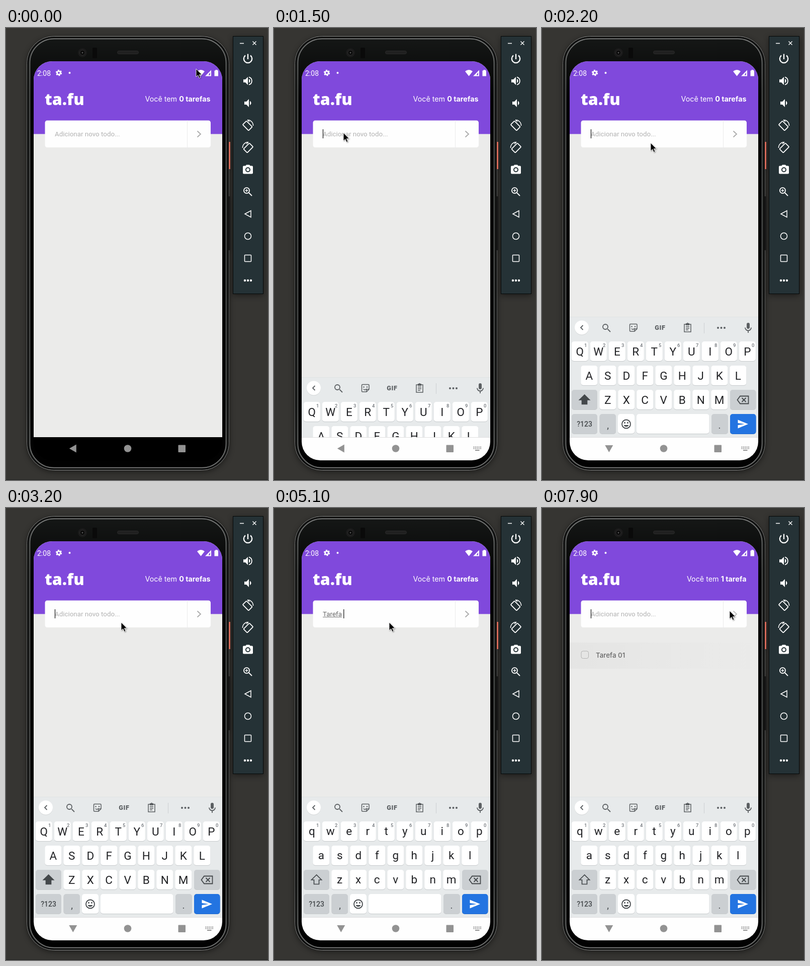
Write an HTML page that moves like this. It is 521 px wide and 897 px high and loops after 8000 ms.

```html
<!DOCTYPE html>
<html lang="pt">
<head>
<meta charset="utf-8">
<title>Tarefas</title>
<style>
html, body { margin: 0; width: 100%; height: 100%; overflow: hidden; background: #363532; }
svg { display: block; width: 521px; height: 897px; }
text { white-space: pre; }
.roboto { font-family: Roboto, sans-serif; }
.inter { font-family: Inter, sans-serif; }
.logo { font: 800 32px "Open Sans", sans-serif; font-stretch: 75%; }
.line { fill: none; stroke: currentColor; stroke-width: 1.8; }
.thin { stroke-width: 1.5; }
.thick { stroke-width: 2.3; }
.field { font-size: 13.37px; }
.mid { text-anchor: middle; }
.window { filter: drop-shadow(0 3px 6px #0007); }
#cursor { filter: drop-shadow(1px 1.5px 1px #0006); }
</style>
</head>
<body>
<svg viewBox="0 0 521 897">
  <defs>
    <clipPath id="screen"><rect x="55" y="66" width="375" height="792" rx="37"/></clipPath>
    <clipPath id="aboveNav"><rect x="55" y="66" width="375" height="746"/></clipPath>
    <linearGradient id="fade"><stop stop-color="#e5e5e4"/><stop offset="1" stop-color="#ebebea"/></linearGradient>
    <linearGradient id="metal" x2="0" y2="1">
      <stop stop-color="#858685"/><stop offset=".12" stop-color="#5c5e5d"/><stop offset=".85" stop-color="#5c5e5d"/><stop offset="1" stop-color="#858685"/>
    </linearGradient>
    <linearGradient id="glass" x2="0" y2="1"><stop stop-color="#151716"/><stop offset=".15" stop-color="#020202"/></linearGradient>
  </defs>
  <rect width="521" height="897" fill="#363532"/>
  <path d="M0 896.5H521" stroke="#222"/>

  <!-- phone body -->
  <g class="window">
    <rect x="41.5" y="16.5" width="402" height="861" rx="54" fill="#222423" stroke="url(#metal)"/>
    <rect x="43.5" y="18.5" width="398" height="857" rx="52" fill="none" stroke="#0a0a0a" stroke-width="2"/>
    <rect x="47.5" y="21.5" width="390" height="851" rx="48" fill="url(#glass)" stroke="url(#metal)" stroke-width="1.5"/>
    <rect x="443" y="226" width="3" height="54" fill="#e2705f"/>
    <rect x="443" y="334" width="3" height="107" fill="#1a1a1a"/>
  </g>
  <circle cx="152" cy="49" r="9" fill="#1b1b1b"/>
  <circle cx="152" cy="49" r="5" fill="#090909" stroke="#303030"/>
  <circle cx="152" cy="49" r="1.5" fill="#555"/>
  <rect x="172" y="39" width="9" height="21" rx="2" fill="#0a0a0a"/>
  <rect x="221.5" y="45.5" width="42" height="6" rx="3" fill="#202020" stroke="#2b2b2b"/>

  <g clip-path="url(#screen)">
    <rect x="55" y="66" width="375" height="746" fill="#ebebea"/>
    <rect x="55" y="66" width="375" height="144.4" fill="#8049dc"/>

    <!-- status bar -->
    <g fill="#fff">
      <text class="roboto" x="62" y="94.5" font-size="14">2:08</text>
      <circle cx="105" cy="89" r="3.3" fill="none" stroke="#fff" stroke-width="2.6"/>
      <circle cx="105" cy="89" r="5.2" fill="none" stroke="#fff" stroke-width="2" stroke-dasharray="3 2.445"/>
      <circle cx="126.5" cy="89" r="2"/>
      <path d="M380 86Q387.5 80 395 86L387.5 95.5Z"/>
      <path d="M396 95.5L408 83.5V95.5ZM402.5 93.5H406V88Z" fill-rule="evenodd"/>
      <path d="M414.5 84.5H416.5V83H420.5V84.5H422V95.5H414.5Z"/>
    </g>

    <text class="logo" x="77" y="153" fill="#fff">ta.fu</text>
    <text class="inter" x="406.5" y="146" font-size="14.3" fill="#fff" text-anchor="end">Você tem <tspan id="count" font-weight="700"></tspan></text>

    <!-- new task field -->
    <rect x="77.5" y="183.4" width="329.5" height="53.6" rx="4.5" fill="#fefefe"/>
    <path d="M360.5 183.4V237" stroke="#ebebea"/>
    <path id="chevron" d="M380.5 204.5L387 210.5L380.5 216.5" fill="none" stroke="#aaa" stroke-width="1.8"/>
    <text id="hint" class="roboto field" x="97" y="215" fill="#b2b2b2">Adicionar novo todo...</text>
    <text id="typed" class="roboto field" x="97" y="215" fill="#666"></text>
    <rect id="underline" x="97" y="216" height="1" fill="#777"/>
    <rect id="caret" y="201" width="1.8" height="18" fill="#555"/>

    <g id="task">
      <rect x="55" y="267" width="375" height="52" fill="url(#fade)"/>
      <rect x="78" y="284" width="14.5" height="14.5" rx="3.5" fill="none" stroke="#b2b2b2"/>
      <text class="inter field" x="107" y="297" font-weight="500" fill="#666">Tarefa 01</text>
    </g>

    <!-- keyboard -->
    <g clip-path="url(#aboveNav)"><g id="keyboard" class="roboto">
      <rect x="55" y="573" width="375" height="240" fill="#e7eaeb"/>
      <path d="M55 573.5H430" stroke="#e0e3e4"/>
      <g id="keys"></g>
      <circle cx="79" cy="595.5" r="14" fill="#d2d5d6"/>
      <circle cx="79" cy="594.5" r="14" fill="#fff"/>
      <g color="#5b5f62" fill="#5b5f62">
        <path class="line" d="M81.5 590L77 594.5L81.5 599"/>
        <path class="line" d="M130.500 597.5L136 603"/><circle class="line" cx="126" cy="593" r="5"/>
        <path class="line thin" d="M176 587.5H187.5Q189 587.5 189 589V597L184 602H176Q174.5 602 174.5 600.5V589Q174.5 587.5 176 587.5ZM189 597H184V602M178 596.5Q181 600 184 596"/>
        <circle cx="178.5" cy="592.5" r="1.2"/><circle cx="185" cy="592.5" r="1.2"/>
        <text class="mid" x="235" y="599" font-size="12.5" font-weight="900" letter-spacing=".8">GIF</text>
        <path class="line thin" d="M283 588H296V603H283ZM286 592.5H293M286 595.7H293M286 599H291"/>
        <path d="M286 586H288Q289.5 583.5 291 586H293V590H286Z"/>
        <path d="M322.5 585V606" stroke="#cdd0d2"/>
        <circle cx="350" cy="595" r="2"/><circle cx="356.5" cy="595" r="2"/><circle cx="363" cy="595" r="2"/>
        <rect x="407" y="585" width="6" height="12" rx="3"/>
        <path class="line" d="M404 594.5A6 6 0 0 0 416 594.5M410 600.5V605"/>
      </g>
      <path id="shift" d="M84.5 728L74.5 738H79.5V746.5H89.5V738H94.5Z" stroke="#44484b" stroke-width="1.7"/>
      <g color="#44484b" fill="#44484b">
        <path class="line" d="M394 730.5H410.5V745.5H394L388.5 738ZM397.5 734L405.5 742M405.5 734L397.5 742"/>
        <text class="mid" x="84.5" y="791" font-size="14" font-weight="500">?123</text>
        <text class="mid" x="131" y="795" font-size="19">,</text>
        <text class="mid" x="353" y="795" font-size="19">.</text>
        <circle class="line" cx="167.5" cy="786" r="8.5"/>
        <circle cx="164.5" cy="783.5" r="1.4"/><circle cx="170.5" cy="783.5" r="1.4"/>
        <path d="M162.5 788H172.5A5.5 5.5 0 0 1 162.5 788Z"/>
      </g>
      <path d="M389.5 777.5L410 786L389.5 794.5V788L403 786L389.5 784Z" fill="#fff"/>
    </g></g>

    <!-- navigation bar -->
    <rect id="navBar" x="55" y="812" width="375" height="46"/>
    <path id="navEdge" d="M55 812.5H430" stroke="#e0e0e0"/>
    <g fill="#929292">
      <path id="back" d="M-7.5 0L6.5 -8V8Z"/>
      <circle cx="242" cy="834.5" r="7.3"/>
      <rect x="342.5" y="827.5" width="14.5" height="14.5" rx="1"/>
      <g id="imeIcon" stroke="#929292" stroke-width="1.8">
        <path d="M396.5 831.5H412M396.5 834.5H412" stroke-dasharray="1.9 1.5"/>
        <path d="M400 838H408.5"/>
      </g>
    </g>
  </g>

  <!-- emulator toolbar -->
  <rect class="window" x="451.5" y="16.5" width="60" height="511" fill="#253236" stroke="#050808"/>
  <g fill="#fff" color="#fff">
    <path d="M465 30.5H473M490.5 26.500L497.5 33.5M497.5 26.5L490.5 33.5" stroke="#fff" stroke-width="1.4"/>
    <path class="line thick" transform="translate(481 61)" d="M0 -9.5V1M5 -6.5A8.2 8.2 0 1 1 -5 -6.5"/>
    <g transform="translate(481 105)">
      <path d="M-9 -3H-5L0 -8V8L-5 3H-9ZM2 -4.2A4.7 4.7 0 0 1 2 4.2Z"/>
      <path class="line" d="M2 -7.7A8 8 0 0 1 2 7.7"/>
    </g>
    <path transform="translate(481 149)" d="M-7 -3H-3L2 -8V8L-3 3H-7ZM4 -4.2A4.7 4.7 0 0 1 4 4.2Z"/>
    <g id="rotate" transform="translate(481 193)">
      <rect class="line" x="-5.2" y="-8.2" width="10.4" height="16.4" rx="1" transform="translate(-.8 1) rotate(-45)"/>
      <path class="line thin" d="M-1 -10.5A11 11 0 0 1 10.5 1M-1 -10.5L3 -7"/>
    </g>
    <use href="#rotate" transform="matrix(-1 0 0 1 962 44)"/>
    <path transform="translate(481 281)" fill-rule="evenodd" d="M-3 -9.5H3L4.7 -7.5H8Q10 -7.5 10 -5.5V6.5Q10 8.5 8 8.5H-8Q-10 8.5 -10 6.5V-5.5Q-10 -7.5 -8 -7.5H-4.7ZM0 -4.7A5 5 0 0 0 0 5.3A5 5 0 0 0 0 -4.7ZM0 -2.7A3 3 0 0 1 0 3.3A3 3 0 0 1 0 -2.7Z"/>
    <g transform="translate(481 325)">
      <circle class="line" cx="-2.5" cy="-2.5" r="5.6"/>
      <path class="line" d="M2 2L8 8"/>
      <path class="line thin" d="M-5.5 -2.5H.5M-2.5 -5.5V.5"/>
    </g>
    <path class="line thin" d="M475 369L487 362.5V375.5Z"/>
    <circle class="line thin" cx="481" cy="413" r="6.5"/>
    <rect class="line thin" x="474.5" y="450.5" width="13" height="13" rx="1"/>
    <circle cx="475" cy="501" r="2.2"/><circle cx="481" cy="501" r="2.2"/><circle cx="487" cy="501" r="2.2"/>
  </g>

  <path id="cursor" d="M0 0V16L3.7 12.7L6.3 18.5L8.9 17.4L6.4 11.7H11.5Z" fill="#000" stroke="#fff" stroke-width=".9"/>
</svg>
<script>
const LOOP = 8000, TICK = 100;
const $ = id => document.getElementById(id);
const show = (id, on) => $(id).setAttribute('visibility', on ? 'visible' : 'hidden');
const set = (id, name, value) => $(id).setAttribute(name, value);
const write = (el, text) => { if (el.textContent !== text) el.textContent = text; };

function add(tag, attrs, text = '') {
  const el = document.createElementNS('http://www.w3.org/2000/svg', tag);
  for (const name in attrs) el.setAttribute(name, attrs[name]);
  el.textContent = text;
  $('keys').append(el);
  return el;
}

function addKey(x, y, width, fill = '#fff', shadow = '#c6cacc') {
  const box = { x, width, height: 39, rx: 5 };
  add('rect', { ...box, y: y + 1, fill: shadow });
  add('rect', { ...box, y, fill });
}

const GREY = '#cbcfd2';
const letters = [];
[['QWERTYUIOP', 75.3], ['ASDFGHJKL', 93.8], ['ZXCVBNM', 130.7]].forEach(([row, left], r) => {
  const y = 622 + r * 48;
  [...row].forEach((letter, i) => {
    const x = left + i * 37;
    addKey(x - 16.5, y, 33);
    letters.push(add('text', { x, y: y + 28, class: 'mid', 'font-size': 22.5, fill: '#202124' }, letter));
    if (r === 0) add('text', { x: x + 11.5, y: y + 11, class: 'mid', 'font-size': 9.5, 'font-weight': 500, fill: '#70757a' }, (i + 1) % 10);
  });
});
addKey(59, 718, 51, GREY);
addKey(374, 718, 51.5, GREY);
addKey(59, 766, 51, GREY);
addKey(114.5, 766, 32.5, GREY);
addKey(151, 766, 33);
addKey(188, 766, 144.5);
addKey(337, 766, 33, GREY);
addKey(374, 766, 51.5, '#2374e1', '#2069cb');

// Time, x, y of the pointer tip
const pointer = [
  [200, 378, 81], [1000, 138, 208], [1800, 138, 208], [2200, 216, 228], [2400, 235, 229],
  [2600, 235, 229], [2700, 229, 227], [6400, 229, 227], [6500, 380, 240], [6600, 414, 242],
  [6700, 388, 202], [6800, 358, 173], [7100, 358, 173], [7200, 362, 181], [7400, 362, 181], [7500, 373, 204]
];
// Moments at which the caret flips, starting hidden
const blinks = [1200, 1700, 2200, 2700, 3200, 3800, 4300, 5600, 6000, 6600, 7000];
const strokes = [4400, 4600, 4700, 4800, 4900, 5000, 5100, 6000, 6000];

const ramp = (t, from, to) => Math.min(1, Math.max(0, (t - from) / (to - from)));
const smooth = p => p * p * (3 - 2 * p);

function pointerAt(t) {
  const next = pointer.findIndex(([time]) => time > t);
  if (next === 0) return pointer[0].slice(1);
  if (next < 0) return pointer[pointer.length - 1].slice(1);
  const [t0, x0, y0] = pointer[next - 1], [t1, x1, y1] = pointer[next];
  const p = smooth(ramp(t, t0, t1));
  return [x0 + (x1 - x0) * p, y0 + (y1 - y0) * p];
}

function draw(t) {
  const added = t >= 7700, lower = t >= 4500, keyboardUp = t >= 1500;
  const text = added ? '' : 'Tarefa 01'.slice(0, strokes.filter(s => s <= t).length);
  write($('typed'), text);
  show('hint', !text);
  const length = text ? $('typed').getComputedTextLength() : 0;
  set('caret', 'x', 96.6 + length);
  show('caret', blinks.filter(b => b <= t).length % 2);

  const word = text.trim().length;
  show('underline', word && t < 6000);
  set('underline', 'width', word ? $('typed').getSubStringLength(0, word) : 0);

  write($('count'), added ? '1 tarefa' : '0 tarefas');
  show('task', added);
  set('chevron', 'opacity', added ? 0.75 : 1);

  set('keyboard', 'transform', `translate(0 ${240 * (1 - smooth(ramp(t, 1400, 1600)))})`);
  for (const el of letters) {
    write(el, lower ? el.textContent.toLowerCase() : el.textContent.toUpperCase());
    el.setAttribute('dy', lower ? -1.5 : 0);
  }
  set('shift', 'fill', lower ? 'none' : '#44484b');

  set('navBar', 'fill', keyboardUp ? '#fefefe' : '#000');
  show('navEdge', keyboardUp);
  show('imeIcon', t >= 1400);
  set('back', 'transform', `translate(133.3 834.5) rotate(${-90 * smooth(ramp(t, 1600, 1900))})`);

  set('cursor', 'transform', `translate(${pointerAt(t)})`);
}

function frame() {
  draw(Math.floor(performance.now() % LOOP / TICK) * TICK);
  requestAnimationFrame(frame);
}
frame();
</script>
</body>
</html>
```
